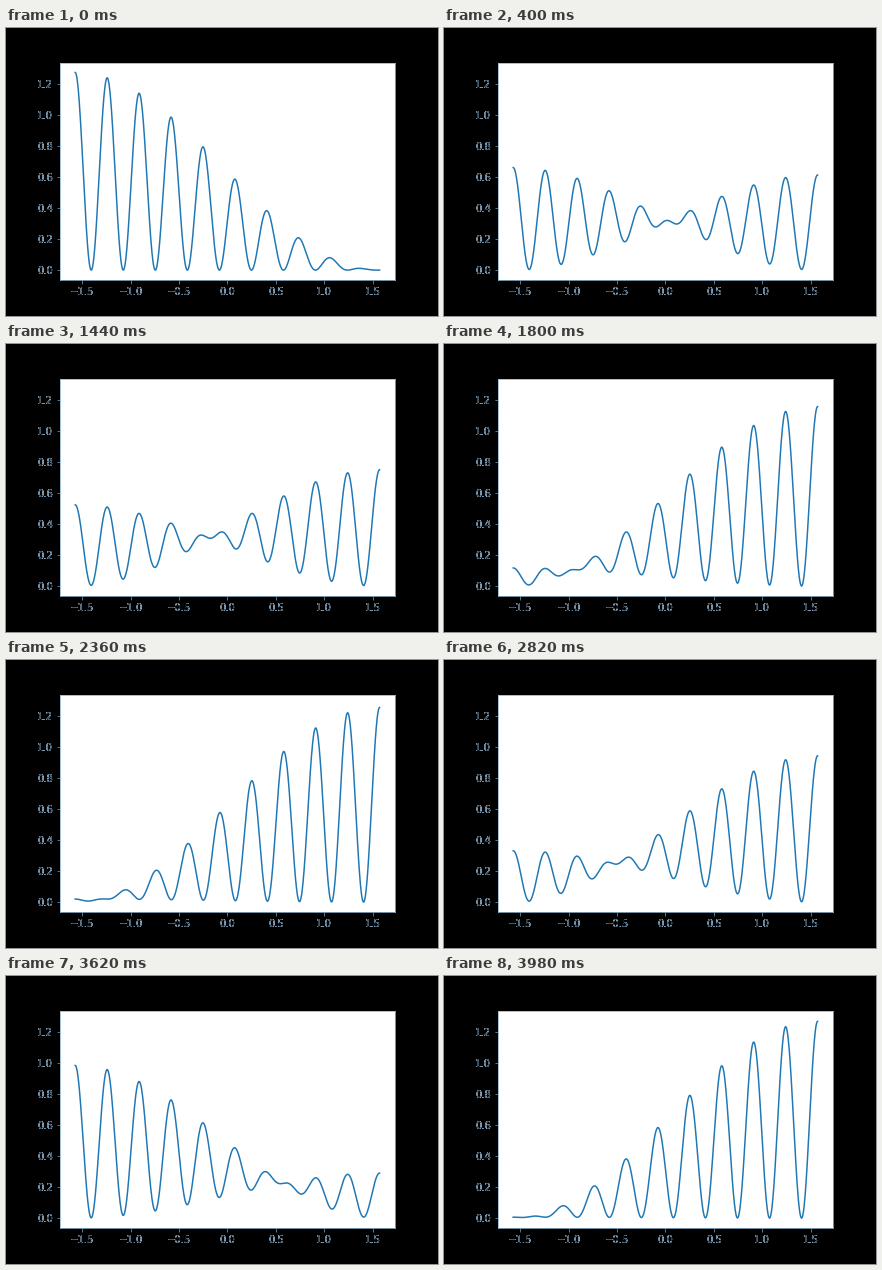
These frames come from a looping animation (432 by 288 pixels, 4 s). A matplotlib script:

```python
import numpy as np
import matplotlib.pyplot as plt
from matplotlib.animation import FuncAnimation

FRAMES, INTERVAL = 200, 20
DT = 0.025
N1, N2 = 9, 10
FRINGE = (0.50, 0.62, 0.72)


def density(t):
    """Probability density of two equally mixed box states."""
    a, b = np.cos(N1 * (x + np.pi / 2)), np.cos(N2 * (x + np.pi / 2))
    phase = (N2**2 - N1**2) / 2 * t
    return (a**2 + b**2 + 2 * a * b * np.cos(phase)) / np.pi


def edges_only(img, dpi):
    """Keep just the half-covered pixels, as a pale outline."""
    a = img[..., 3]
    out = np.empty_like(img)
    out[..., :3] = FRINGE
    out[..., 3] = np.clip(4 * a * (1 - a), 0, 1)
    return out, 0, 0


plt.rcParams["font.family"] = "DejaVu Sans"
fig, ax = plt.subplots(figsize=(6, 4), dpi=72, facecolor="black")
fig.subplots_adjust(left=0.125, right=0.9, bottom=0.125, top=0.88)

x = np.linspace(-np.pi / 2, np.pi / 2, 1000)
line, = ax.plot(x, density(0), color="#1f77b4", lw=1.5)
ax.set_xlim(ax.get_xlim())
ax.set_ylim(ax.get_ylim())

ax.tick_params(color="#6f8ea3")
for spine in ax.spines.values():
    spine.set_color("#8fb4cc")
fig.canvas.draw()
for label in ax.get_xticklabels() + ax.get_yticklabels():
    label.set_agg_filter(edges_only)


def update(i):
    line.set_ydata(density(i * DT))
    return line,


anim = FuncAnimation(fig, update, frames=FRAMES, interval=INTERVAL,
                     repeat=True, repeat_delay=0, blit=False)
plt.show()
```
